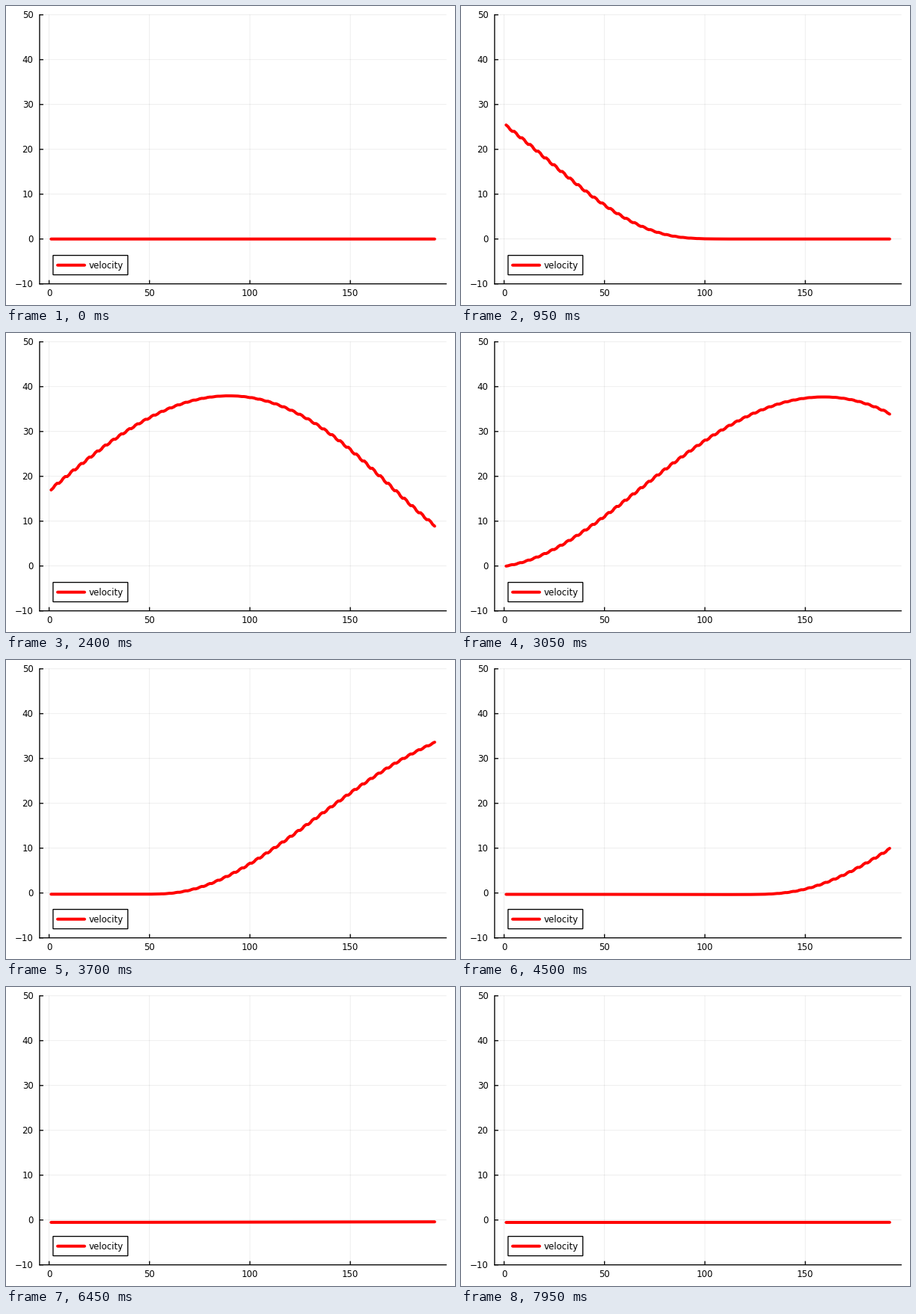
Recreate the animation shown at these times as a matplotlib script. Size 600 by 400 pixels, loop 8 s.

```python
import numpy as np
import matplotlib.pyplot as plt
from matplotlib.animation import FuncAnimation
from matplotlib.patches import Rectangle

W, H, DPI = 600, 400, 100
STEP, FRAMES = 50, 160
PX = 72 / DPI

# plot area in pixels
LEFT, RIGHT, TOP, BOTTOM = 44.9, 588.2, 11.8, 371.7
X_MIN, X_MAX, Y_MIN, Y_MAX = -4.73, 197.73, -10, 50

# pulse: height, duration (ms), wave speed (nodes per ms) and its rise with height
PEAK, PULSE = 38.25, 3130
SPEED, GAIN, SPREAD = 0.0985, 0.00023, 86
LENGTH = 192


def px(x):
    return LEFT + (x - X_MIN) / (X_MAX - X_MIN) * (RIGHT - LEFT)


def py(y):
    return BOTTOM - (y - Y_MIN) / (Y_MAX - Y_MIN) * (BOTTOM - TOP)


def ramp(t, start, end):
    p = np.clip((t - start) / (end - start), 0, 1)
    return p * p * (3 - 2 * p)


def inlet(t):
    pulse = PEAK * np.sin(np.pi * np.clip(t / PULSE, 0, 1)) ** 2
    return pulse - 0.27 * ramp(t, 1500, PULSE)


# 48 elements of four unevenly spaced nodes, plotted by node index
nodes = np.arange(1, LENGTH + 1)
inner = (1 + np.array([-1, -0.2 ** 0.5, 0.2 ** 0.5, 1])) / 2
place = 4 * (np.arange(48)[:, None] + inner).ravel()

points, weights = np.polynomial.hermite_e.hermegauss(15)
weights = weights / weights.sum()
blur = np.sqrt(SPREAD * place)[:, None] * points


def velocity(t):
    u = np.zeros(LENGTH)
    if t == 0:
        return u
    for _ in range(14):
        delay = place / (SPEED + GAIN * np.maximum(u, 0))
        u = inlet((t - delay)[:, None] + blur) @ weights
    echo = -0.12 * ramp(t - (LENGTH - place) / SPEED, 1950, 5000)
    second = -0.15 * ramp(t - place / SPEED, 3900, 6700)
    return u + echo + second


fig = plt.figure(figsize=(W / DPI, H / DPI), dpi=DPI, facecolor="white")
ax = fig.add_axes([0, 0, 1, 1])
ax.set_xlim(0, W)
ax.set_ylim(H, 0)
ax.axis("off")


def stroke(xs, ys, color="black", width=1.33, **kw):
    return ax.plot(xs, ys, color=color, lw=width * PX, snap=False, **kw)[0]


def label(x, y, text, align):
    ax.text(x, y, text, ha=align, va="baseline", family="DejaVu Sans",
            size=11.8 * PX, color="black")


for x in range(0, 151, 50):
    stroke([px(x)] * 2, [TOP, BOTTOM], width=0.67, alpha=0.1)
    stroke([px(x)] * 2, [BOTTOM, BOTTOM - 5], solid_capstyle="butt")
    label(px(x), 387.6, str(x), "center")
for y in range(-10, 51, 10):
    stroke([LEFT, RIGHT], [py(y)] * 2, width=0.67, alpha=0.1)
    stroke([LEFT, LEFT + 5], [py(y)] * 2, solid_capstyle="butt")
    label(36.5, py(y) + 4.4, str(y).replace("-", "\u2212"), "right")
stroke([LEFT, LEFT], [TOP, BOTTOM])
stroke([LEFT, RIGHT], [BOTTOM, BOTTOM])

RED = dict(color="red", width=4, solid_capstyle="round", solid_joinstyle="round")
curve = stroke(px(nodes), py(np.zeros(LENGTH)), zorder=4, **RED)

ax.add_patch(Rectangle((62.9, 333.6), 99.9, 26, facecolor="white",
                       edgecolor="black", lw=1.33 * PX, snap=False, zorder=5))
stroke([69, 105], [346.7] * 2, zorder=6, **RED)
ax.texts[-1].set_zorder(3)
ax.text(110.7, 351.1, "velocity", va="baseline", family="DejaVu Sans",
        size=11.8 * PX, color="black", zorder=6)


def draw(n):
    curve.set_ydata(py(velocity(n * STEP)))
    return (curve,)


anim = FuncAnimation(fig, draw, frames=FRAMES, interval=STEP,
                     repeat=True, repeat_delay=0, blit=False)
plt.show()
```
